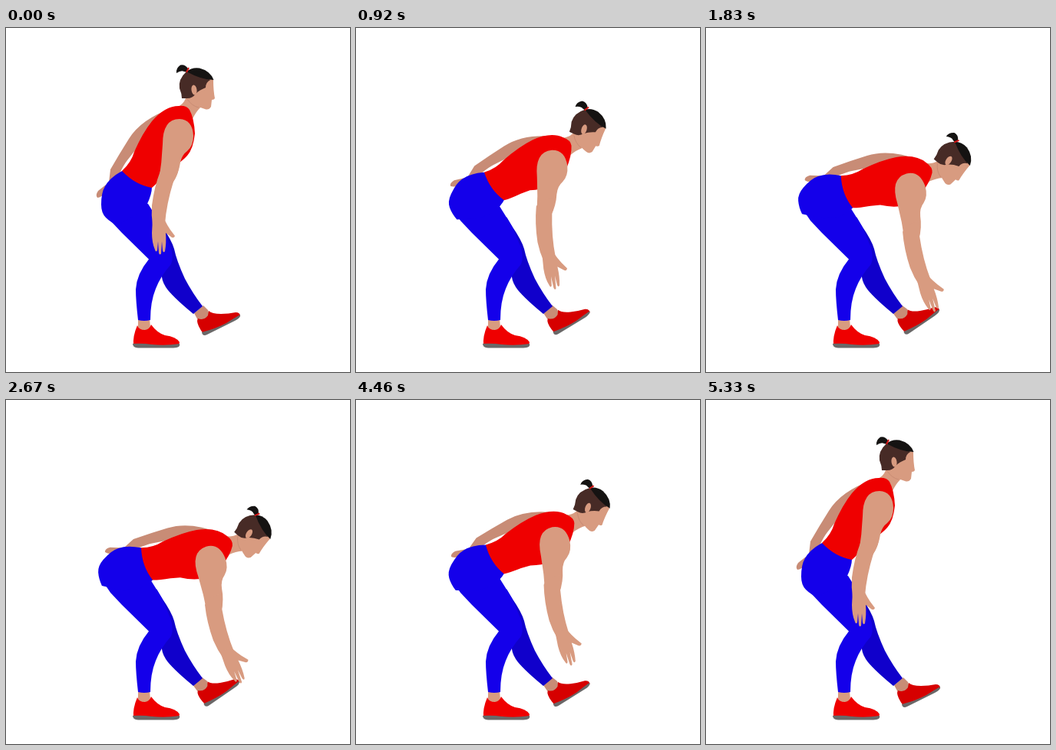
These frames come from a looping animation (448 by 450 pixels, 5.37 s). An HTML page:

```html
<!DOCTYPE html>
<html lang="en">
<head>
<meta charset="utf-8">
<title>Standing forward stretch</title>
<style>
  html, body { margin: 0; width: 100%; height: 100%; overflow: hidden; background: #fff; }
  svg { display: block; width: 100%; height: 100%; }
  .skin { fill: #d89b80; }
  .shade { fill: #c88c76; }
  .blue { fill: #1400ea; }
  .navy { fill: #1000cb; }
  .red { fill: #ef0000; }
  .far-shoe { fill: #d60000; }
  .sole { fill: #6a6868; }
  .brown { fill: #472b26; }
  .black { fill: #151312; }
</style>
</head>
<body>
<svg viewBox="0 0 448 450">
  <!-- far arm, behind the hips -->
  <g class="bend">
    <path class="shade" d="M216 105Q176 119 160 145Q148 164 136 185L134 202L120 213Q116 219 119 222Q124 222 131 214L148 190Q154 178 158 173L176 150L205 130Z"/>
  </g>

  <!-- far leg -->
  <g id="foot">
    <path class="shade" d="M245 373L257 363L263 369L266 378L252 386Z"/>
    <path class="far-shoe" d="M250 380Q258 383 263 376L264 370Q268 374 280 374Q290 374 299 372Q305 372 305 377Q283 391 257 400Q249 389 249 383Z"/>
    <path class="sole" d="M255 398Q274 393 287 386Q296 380 305 375Q306 379 298 383L262 401Q256 404 255 398Z"/>
  </g>
  <path class="navy" d="M196 247L203 259Q216 278 219 289Q222 304 233 328Q243 347 256 364L244 374Q221 355 211 343Q204 334 203 326Z"/>

  <!-- near leg -->
  <path class="skin" d="M172 380H187L188 392L181 397L172 393Z"/>
  <path class="red" d="M171 389Q173 395 181 395Q187 394 189 388Q197 399 207 402Q222 404 226 411L225 415H166Q165 403 171 389Z"/>
  <path class="sole" d="M165 413Q178 412 190 414Q208 416 226 413Q228 418 218 418.5H172Q165 418 165 413Z"/>
  <path class="blue" d="M130 243L136 252L151 268L186 302.5Q170 322 169 342Q169 356 172 382Q180 384 188 382Q188 358 195 341Q201 325 215 309Q219 299 214 285L203 259L185 230L155 222Z"/>

  <!-- hips, torso and head -->
  <g class="bend">
    <path class="blue" d="M151 187Q135 196 129 207Q124 215 124 231Q124 242 130 248Q136 254 145 258L170 245L184 230Q190 217 190 208L172 192Z"/>
    <path class="skin" d="M237 88L254 103Q247 110 243 119L222 104Q231 100 234 92Z"/>
    <path class="skin" d="M238 72L262 64L270 68Q270 82 272 92Q271 94 268 94L267 103Q264 108 259 106Q249 104 238 92Z"/>
    <path d="M236 93Q242 102 251 104" fill="none" stroke="#c98c74" stroke-width="1"/>
    <path class="brown" d="M235 57Q224 67 226 79Q229 86 229 92H236Q243 92 247 86Q252 81 260 78Q260 71 266 68L250 56Z"/>
    <path class="black" d="M235 57Q242 51 252 52.5Q266 56 270.5 68Q255 68 235 57Z"/>
    <path class="black" d="M237 53Q233 47 227 48.5Q221 53 222 59Q228 55 232 57L237 58Z"/>
    <path d="M238 52L235 58" stroke="#d81414" stroke-width="2"/>
    <ellipse class="skin" cx="245" cy="81" rx="3.5" ry="6.5" transform="rotate(-8 245 81)"/>
    <path class="red" d="M151 187Q163 176 167 162Q178 137 190 122Q207 102 225 102Q235 101 239 107Q245 118 246 138Q244 158 236 167Q228 176 215 183L206 192Q197 203 190 209Q168 205 151 187Z"/>
  </g>

  <!-- near arm -->
  <g id="upper" class="skin">
    <path d="M204 152Q204 119 226 119Q243 120 244 141Q244 154 236 161Q229 166 227 176Q225 190 217 203Q207 210 199 200Q203 176 204 152Z"/>
    <g id="fore">
      <path d="M201 187Q193 208 190 232Q189 245 191 258L207 256Q209 230 218 201Q223 194 225 184Q211 178 201 187Z"/>
      <g id="hand">
        <path d="M191 249L206 250Q210 258 214 264L220 272Q219 275 216 274L208 268Q209 281 207 292Q205 295 204 291L203 279L202 295Q200 298 199 294L198 279L197 291Q195 294 194 290Q190 281 190 268Z"/>
      </g>
    </g>
  </g>
</svg>
<script>
const LOOP = 5370, FPS = 24;

// Rows: frame, torso, upper arm, forearm, hand (degrees from the upright pose).
const lower = [[4, 0, 0, 0, 0], [14, 13.4, .7, -9, -5.3], [32, 36.4, -13, -22.3, -12.4], [64, 41, -19.5, -27, -22]];
const raise = [[96, 41, -19.5, -27, -22], [116, 13, -4.2, -14.9, -5], [128, 0, 0, 0, 0]];

const HIP = [155, 223.6], SHOULDER = [226, 135], ELBOW = [211, 196], WRIST = [198, 252], HEEL = [250, 380];
const byId = id => document.getElementById(id);
const bending = document.querySelectorAll('.bend');
const turn = (angle, [x, y]) => `rotate(${angle} ${x} ${y})`;

// Smooth curve through the rows, at rest at both ends.
function sample(rows, frame) {
  const last = rows.length - 1;
  frame = Math.min(Math.max(frame, rows[0][0]), rows[last][0]);
  let i = 0;
  while (i < last - 1 && frame > rows[i + 1][0]) i++;
  const a = rows[i], b = rows[i + 1], span = b[0] - a[0], u = (frame - a[0]) / span;
  const slope = (k, c) => k === 0 || k === last ? 0
    : (rows[k + 1][c] - rows[k - 1][c]) / (rows[k + 1][0] - rows[k - 1][0]) * span;
  const s = u * u * (3 - 2 * u);
  return [1, 2, 3, 4].map(c => a[c] * (1 - s) + b[c] * s
    + slope(i, c) * u * (1 - u) ** 2 - slope(i + 1, c) * u * u * (1 - u));
}

function draw(ms) {
  const frame = Math.floor((ms % LOOP) * FPS / 1000 + .2);
  const [torso, upper, fore, hand] = sample(frame < 80 ? lower : raise, frame);
  const amount = torso / 41;

  bending.forEach(part => part.setAttribute('transform', turn(torso, HIP)));
  byId('foot').setAttribute('transform', turn(-8 * amount, HEEL));

  // The shoulder follows the torso and sinks a little as the arm reaches.
  const angle = torso * Math.PI / 180, cos = Math.cos(angle), sin = Math.sin(angle);
  const rx = SHOULDER[0] - HIP[0], ry = SHOULDER[1] - HIP[1];
  const x = HIP[0] + rx * cos - ry * sin - .7 * amount;
  const y = HIP[1] + rx * sin + ry * cos + 4 * amount;
  byId('upper').setAttribute('transform',
    `translate(${x} ${y}) rotate(${upper}) scale(${1 + .03 * amount}) translate(${-SHOULDER[0]} ${-SHOULDER[1]})`);
  byId('fore').setAttribute('transform', turn(fore - upper, ELBOW));
  byId('hand').setAttribute('transform', turn(hand - fore, WRIST));
}

const start = performance.now();
function tick() {
  draw(performance.now() - start);
  requestAnimationFrame(tick);
}
tick();
</script>
</body>
</html>
```
